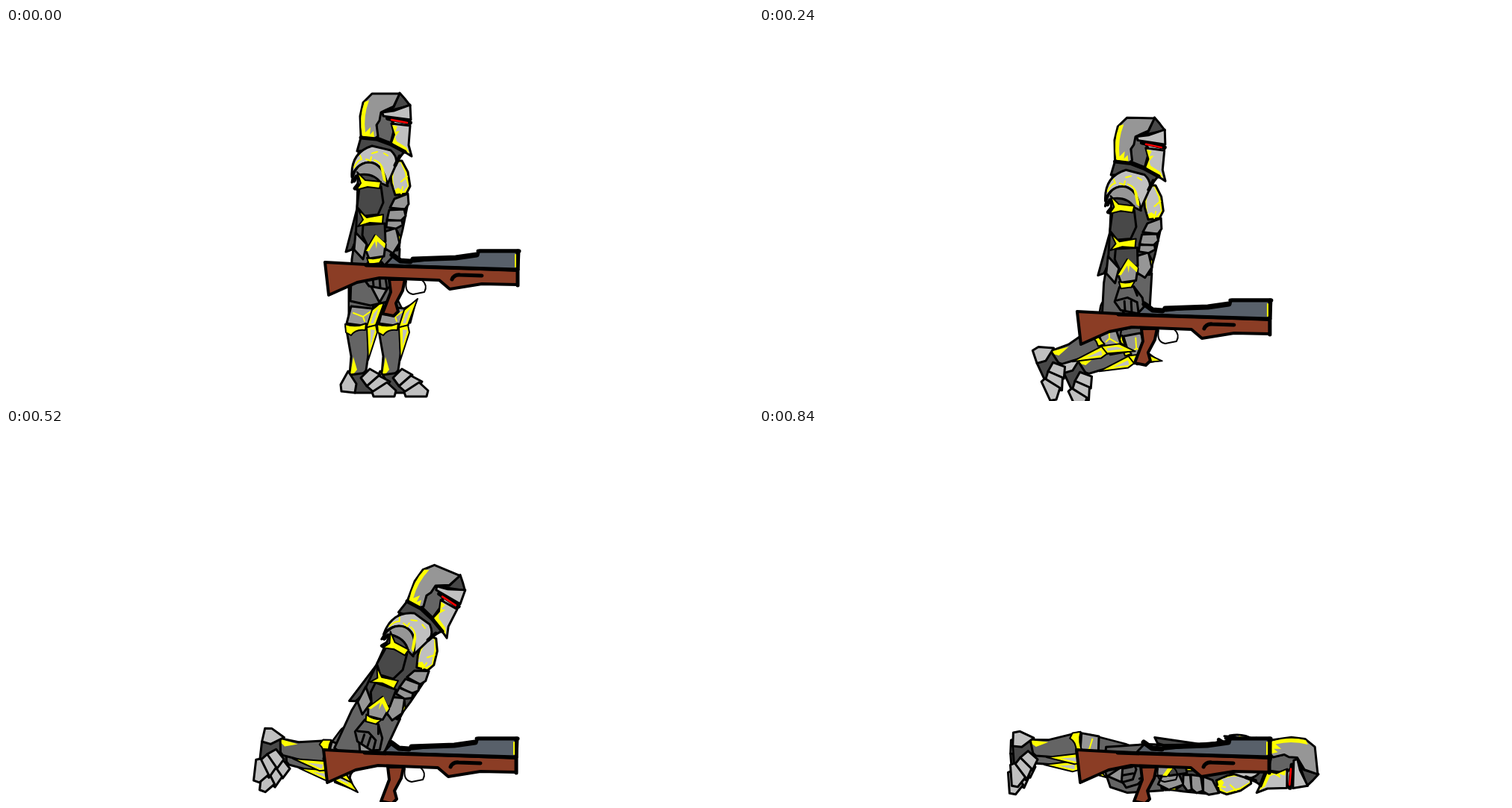
Animation, 1000 px wide and 500 px high, one loop 2000 ms. Source, as an HTML page:

```html
<!DOCTYPE html>
<html lang="en">
<head>
<meta charset="utf-8">
<title>Falling knight</title>
<style>
  html, body { margin: 0; width: 100%; height: 100%; overflow: hidden; background: #fff; }
  svg { display: block; width: 100%; height: 100%; }
  path { stroke: #000; stroke-width: 3; stroke-linejoin: round; stroke-linecap: round; fill: none; }
  .light { fill: #c0c0c0; }
  .mid { fill: #969696; }
  .dark { fill: #646464; }
  .deep { fill: #484848; }
  .gold { fill: #ff0; }
  .steel { fill: #58606a; }
  .wood { fill: #8b3d25; }
  .flat { stroke: none; }
  .trim { stroke: #ff0; stroke-width: 2; }
  .thin { stroke-width: 2; }
  .thick { stroke-width: 5; }
  .thigh-edge { stroke-width: 35; }
  .thigh-fill { stroke-width: 30; stroke: #646464; }
</style>
</head>
<body>
<svg viewBox="0 0 1000 500">
  <defs>
    <g id="leg">
      <path class="mid" d="M462 373 490 376 505 368 498 395 478 399 456 396Z"/>
      <path class="trim" d="M465 382 478 387 488 380M478 387 480 393"/>
      <path class="dark" d="M455 400 483 398 488 420 484 445 482 459 470 471 460 465 462 440Z"/>
      <path class="gold thin" d="M454 397Q468 402 482 396L481 405Q468 403 462 412L455 408Z"/>
      <path class="gold flat" d="M465 441 470 458 460 470Z"/>
      <path class="gold thin" d="M508 363 490 378 483 400 485 445 497 408 495 398Z"/>
      <path class="light flat" d="M499 375 492 383 488 396 492 396ZM488 404 494 405 488 426Z"/>
      <path d="M484 401 496 398" class="thin"/>
      <path class="deep" d="M461 465 483 462 492 489 467 489Z"/>
      <path class="light" d="M458 460 448 478 449 487 467 489 469 477Z"/>
      <path class="light" d="M475 469 487 457 501 465 497 474 483 480Z"/>
      <path class="light" d="M483 480 499 466 514 474 509 482 492 488Z"/>
      <path class="light" d="M490 488 510 475 522 486 520 494 492 494Z"/>
    </g>
  </defs>

  <g id="farLeg"><path class="thigh-edge"/><path class="thigh-fill"/><use href="#leg"/></g>
  <g id="nearLeg"><path class="thigh-edge"/><path class="thigh-fill"/><use href="#leg"/></g>

  <g id="body">
    <!-- waist and trunk -->
    <path class="deep" d="M471 238 455 300 463 297 479 264Z"/>
    <path class="dark" d="M466 290 463 310 461 366 488 372 515 366 525 344 527 296Z"/>
    <path class="mid" d="M488 345 513 345 500 368Z"/>
    <path class="deep" d="M472 165 470 240 468 285 480 296 524 298 531 270 538 235 522 215 520 180 500 160Z"/>
    <path class="mid" d="M507 273 522 268 527 288 518 302 508 296ZM468 274 483 290 478 310 466 297Z"/>
    <path class="gold thin" d="M524 272 528 280 527 294Z"/>
    <path class="mid" d="M520 229 538 222 539 236 534 243 514 241Z"/>
    <path class="mid" d="M513 244 533 243 535 252 528 259 510 257Z"/>
    <path class="mid" d="M510 258 530 258 531 264 522 269 509 267Z"/>
    <path class="deep" d="M475 147 470 165 500 164 521 181 534 165 500 148Z"/>
    <path class="gold" d="M517 178 530 178 538 193 541 212 536 222 521 224 516 208 514 188Z"/>
    <path class="light flat" d="M520 181 528 180 534 194 535 201 538 212 532 219 525 214 520 217 518 202Z"/>
    <path class="trim" d="M537 199 529 206M529 222 531 213"/>

    <!-- arm -->
    <path class="dark" d="M484 315 503 314 515 329 518 345 508 350 486 346 478 335Z"/>
    <path d="M481 333 495 329 508 335M492 346 491 334M501 348 500 334M510 348 508 335M503 314 508 326"/>
    <path class="deep" d="M478 264 507 262 508 286 484 292 477 278Z"/>
    <path class="deep" d="M473 213 502 212 505 234 498 250 480 252 470 240Z"/>
    <path class="mid" d="M482 299 494 278 508 290 506 306 486 309Z"/>
    <path class="gold flat" d="M482 299 495 277 508 289 507 295 497 286 496 296 494 286 486 299Z"/>
    <path class="gold thin" d="M483 308Q494 311 505 306L500 315 486 317Z"/>
    <path class="gold thin" d="M471 243 483 254 505 250 504 262 487 261 471 266 478 257Z"/>
    <path class="light" d="M463 200Q461 167 490 158L515 164Q527 175 520 188L510 211Q505 181 486 180 468 182 463 200Z"/>
    <path class="mid" d="M463 207Q466 181 486 180 505 181 511 212L502 208Q492 193 471 197Z"/>
    <path class="trim" d="M466 187Q470 177 476 176L474 171M482 176 488 178 489 173M493 177Q502 180 505 190M490 168 497 166M506 168 511 171"/>
    <path class="gold flat" d="M500 181Q508 190 509 207L505 204Z"/>
    <path class="gold thin" d="M470 193 481 204 502 206 500 215 484 213 469 217 475 208Z"/>
    <path d="M469 199 466 205M471 210 467 215" class="thick"/>

    <!-- helmet -->
    <path class="deep" d="M527 87 519 106 504 113 541 104 534 95Z"/>
    <path class="dark" d="M502 113 496 130 497 147 515 154 521 130 512 119Z"/>
    <path class="mid" d="M475 145 474 118 478 100 490 88 527 88 519 105 502 113 500 124 496 130 498 145 493 149Z"/>
    <path class="gold flat" d="M480 99Q472 120 477 145L493 147 492 138 487 143 488 133 481 140Q478 118 486 97Z"/>
    <path class="light" d="M504 113 519 111 541 103 542 123 505 118Z"/>
    <path class="light" d="M516 128 541 131 539 157 543 172 516 155 520 143Z"/>
    <path class="gold flat" d="M517 130 524 132 521 139 527 138 521 146 523 152 536 160 540 168 517 154 521 143Z"/>
    <path d="M511 121 541 127" style="stroke-width:6"/>
    <path d="M516 123 537 127" style="stroke:#f00;stroke-width:2.5"/>
    <path d="M475 147 496 149 515 156 534 166M527 172 521 184" class="thick"/>
  </g>

  <g id="gun">
    <path class="thin" d="M536 339Q533 355 545 357L560 354Q565 345 557 338"/>
    <path class="wood" style="stroke-width:4" d="M513 337 534 337 531 352 522 369 525 380 519 386 504 383 515 354Z"/>
    <path class="steel" d="M507 318 520 304 531 313 546 313 632 304 634 298 687 298 686 324Z"/>
    <path d="M517 304 528 312 541 313M545 310 602 308 630 304" style="stroke-width:7"/>
    <path d="M632 299 687 299" class="thick"/>
    <path class="wood" style="stroke-width:4" d="M427 314 482 317 685 325 685 344 637 343 594 350 580 338 500 335 470 341 432 358Z"/>
    <path d="M482 318 685 324M597 337Q600 330 608 331L637 332" class="thick"/>
    <path d="M685 299 685 345" class="thick"/>
    <path class="trim" d="M682 304 682 320"/>
  </g>
</svg>
<script>
const STEP = 40, LOOP = 2000;
const HIP = [475, 345], KNEE = [475, 388];

// step, hip x, y, body angle, knee x, y, shin angle, far leg offset x, y
const poses = [
  [0, 475, 345, 0, 475, 388, 0, 43, 0],
  [3, 474, 359, 0.5, 470, 396, 24, 38, 2],
  [6, 473, 377, 1, 467, 414, 65, 36, 13],
  [10, 473, 399, 1.3, 463, 421, 90, 18, 13],
  [11, 466, 399, 8, 460, 422, 96, 14, 12],
  [14, 458, 421, 30, 433, 447, 97, 5, 13],
  [15, 455, 428, 37, 431, 450, 97, 4, 13],
  [18, 465, 443, 61, 431, 458, 91, 2, 12],
  [21, 487, 438, 84, 441, 426, 86, -3, 10]
];

const part = id => document.getElementById(id);

function poseAt(step) {
  const next = Math.max(1, poses.findIndex(pose => pose[0] >= step));
  const from = poses[next - 1], to = poses[next];
  const mix = (step - from[0]) / (to[0] - from[0]);
  return from.map((value, i) => value + (to[i] - value) * mix);
}

function place(element, x, y, angle, pivot) {
  element.setAttribute("transform",
    `translate(${x} ${y}) rotate(${angle}) translate(${-pivot[0]} ${-pivot[1]})`);
}

function drawLeg(group, hipX, hipY, kneeX, kneeY, angle) {
  for (const thigh of group.querySelectorAll("path"))
    thigh.setAttribute("d", `M${hipX} ${hipY}L${kneeX} ${kneeY}`);
  place(group.querySelector("use"), kneeX, kneeY, angle, KNEE);
}

function draw(now) {
  const step = Math.min(21, Math.floor(now % LOOP / STEP));
  const [, hipX, hipY, lean, kneeX, kneeY, shin, farX, farY] = poseAt(step);
  place(part("body"), hipX, hipY, lean, HIP);
  drawLeg(part("nearLeg"), hipX, hipY, kneeX, kneeY, shin);
  drawLeg(part("farLeg"), hipX + farX / 2, hipY + farY / 2, kneeX + farX, kneeY + farY, shin);
  const drop = Math.min(11 * step, 116);
  place(part("gun"), -drop / 60, drop, 0, [0, 0]);
}

const start = performance.now();
function tick() {
  draw(performance.now() - start);
  requestAnimationFrame(tick);
}
tick();
</script>
</body>
</html>
```
